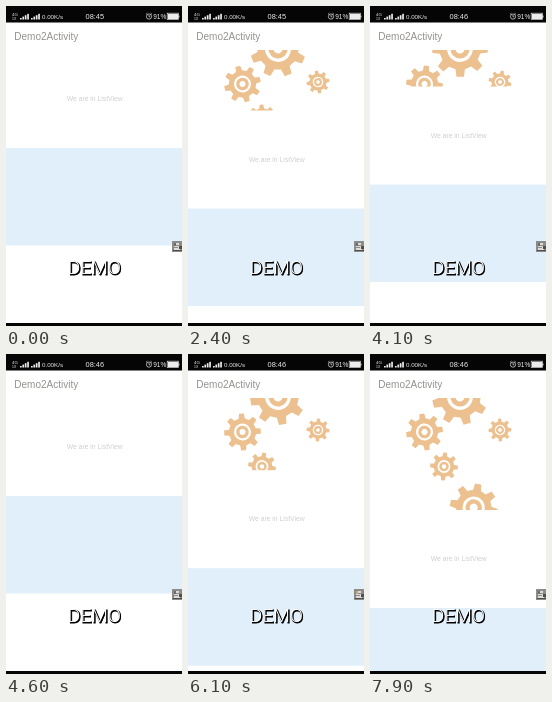
An HTML page that plays this animation: 176 by 320 pixels, repeating every 8 s.

```html
<!DOCTYPE html>
<html lang="en">
<head>
<meta charset="utf-8">
<title>Pull to refresh</title>
<style>
  html, body { margin: 0; width: 100%; height: 100%; overflow: hidden; background: #fff; }
  svg { display: block; width: 100vw; height: 100vh; }
  text { font-family: "Liberation Sans", sans-serif; }
  .status { fill: #ececec; }
  .demo { font: 300 19.2px Roboto, sans-serif; text-anchor: middle; }
</style>
</head>
<body>
<svg viewBox="0 0 176 320">
  <defs>
    <clipPath id="pull"><rect id="window" y="44" width="176" height="0"/></clipPath>
  </defs>
  <rect width="176" height="320" fill="#fff"/>

  <g clip-path="url(#pull)"><g id="gears" fill="#ecc08f" fill-rule="evenodd"></g></g>

  <g id="list">
    <text x="88.7" y="95.3" font-size="6.8" text-anchor="middle" fill="#cfcfcf">We are in ListView</text>
    <rect y="142" width="176" height="97.5" fill="#e1effb"/>
  </g>

  <text x="8.3" y="34.2" font-size="10" fill="#95928e">Demo2Activity</text>

  <rect width="176" height="16.5" fill="#050505"/>
  <g class="status">
    <text x="6" y="10" font-size="4.4">4G</text>
    <text x="6" y="14" font-size="3.4">1X</text>
    <g id="bars"></g>
    <text x="36" y="12.5" font-size="6.2">0.00K/s</text>
    <text id="clock" x="88.8" y="13" font-size="7.4" text-anchor="middle"></text>
    <text x="147.2" y="12.8" font-size="6.5">91%</text>
    <path d="M162 8h10v5h-10zM172.4 9.5h1v2h-1z"/>
  </g>
  <g fill="none" stroke="#ececec" stroke-width=".7">
    <circle cx="143" cy="10.6" r="2.6"/>
    <path d="M143 9v1.8h1.3M140 8.4l1.4-1.3M146 8.4l-1.4-1.3"/>
    <rect x="161.2" y="7.2" width="11.4" height="6.4"/>
  </g>

  <rect x="166" y="235" width="10" height="11" fill="#8b8b89"/>
  <path d="M168 237h5v2h-3v1h4v4h-6v-2h4v-1h-4z" fill="#dedcd8"/>
  <path d="M173 240h3v3h-3zM167 244h9v1h-9z" fill="#4f4e4c"/>
  <rect id="patch" x="168" y="237" width="2" height="3"/>

  <text class="demo" x="89.2" y="268.8" fill="#000" stroke="#000" stroke-width="1">DEMO</text>
  <text class="demo" x="88.4" y="268" fill="#fff">DEMO</text>
  <rect y="317" width="176" height="3" fill="#050505"/>
</svg>

<script>
const LOOP = 8000, STEP = 100;
const NS = 'http://www.w3.org/2000/svg';
const $ = id => document.getElementById(id);

// Finger moves, each easing out from where the last one ended
const moves = [
  { start: 900, end: 2400, to: 60.5, power: 3.3 },
  { start: 2400, end: 3300, to: 22, power: 2 },
  { start: 3300, end: 4100, to: 36.5, power: 2 },
  { start: 4100, end: 4600, to: 0, power: 1 },
  { start: 5200, end: 7900, to: 112, power: 2.55 }
];

// x, y, radius
const gears = [[90, 43, 28], [54.5, 78, 18.5], [130, 76, 11.5], [74, 112.5, 14], [103.7, 153.5, 24]];

function add(parent, tag, attrs) {
  const el = document.createElementNS(NS, tag);
  for (const key in attrs) el.setAttribute(key, attrs[key]);
  return parent.appendChild(el);
}

const ring = r => `M${r} 0A${r} ${r} 0 1 0 ${-r} 0A${r} ${r} 0 1 0 ${r} 0Z`;

function gearPath(r, teeth = 8) {
  const pitch = 2 * Math.PI / teeth;
  const points = [];
  const corner = (turn, size) =>
    points.push(`${Math.cos(turn * pitch) * r * size} ${Math.sin(turn * pitch) * r * size}`);
  for (let i = 0; i < teeth; i++) {
    corner(i - .29, .74);
    corner(i - .17, 1);
    corner(i + .17, 1);
    corner(i + .29, .74);
  }
  return `M${points.join('L')}Z` + ring(r * .46) + ring(r * .34) + ring(r * .16);
}

const wheels = gears.map(([x, y, r], i) =>
  ({ x, y, angle: 8 + i * 6.5, el: add($('gears'), 'path', { d: gearPath(r) }) }));

for (const x of [14, 25]) {
  for (let i = 0; i < 4; i++) {
    const h = 1.5 + i * 1.4;
    add($('bars'), 'rect', { x: x + i * 2.4, y: 13.5 - h, width: 1.7, height: h });
  }
}

function pullAt(t) {
  let y = 0;
  for (const { start, end, to, power } of moves) {
    const u = Math.min(1, Math.max(0, (t - start) / (end - start)));
    y += (to - y) * (1 - (1 - u) ** power);
  }
  return y;
}

function draw(now) {
  const t = Math.floor(now % LOOP / STEP) * STEP;
  const y = pullAt(t);
  $('window').setAttribute('height', y);
  $('list').setAttribute('transform', `translate(0 ${y})`);
  for (const w of wheels) {
    w.el.setAttribute('transform', `translate(${w.x} ${w.y}) rotate(${w.angle + y})`);
  }
  $('clock').textContent = t < 3000 ? '08:45' : '08:46';
  const blink = (t + 4500) % 4700 < 1700;
  $('patch').setAttribute('fill', blink ? '#c9a878' : '#6b6a68');
}

const start = performance.now();
function tick() {
  draw(performance.now() - start);
  requestAnimationFrame(tick);
}
tick();
</script>
</body>
</html>
```
